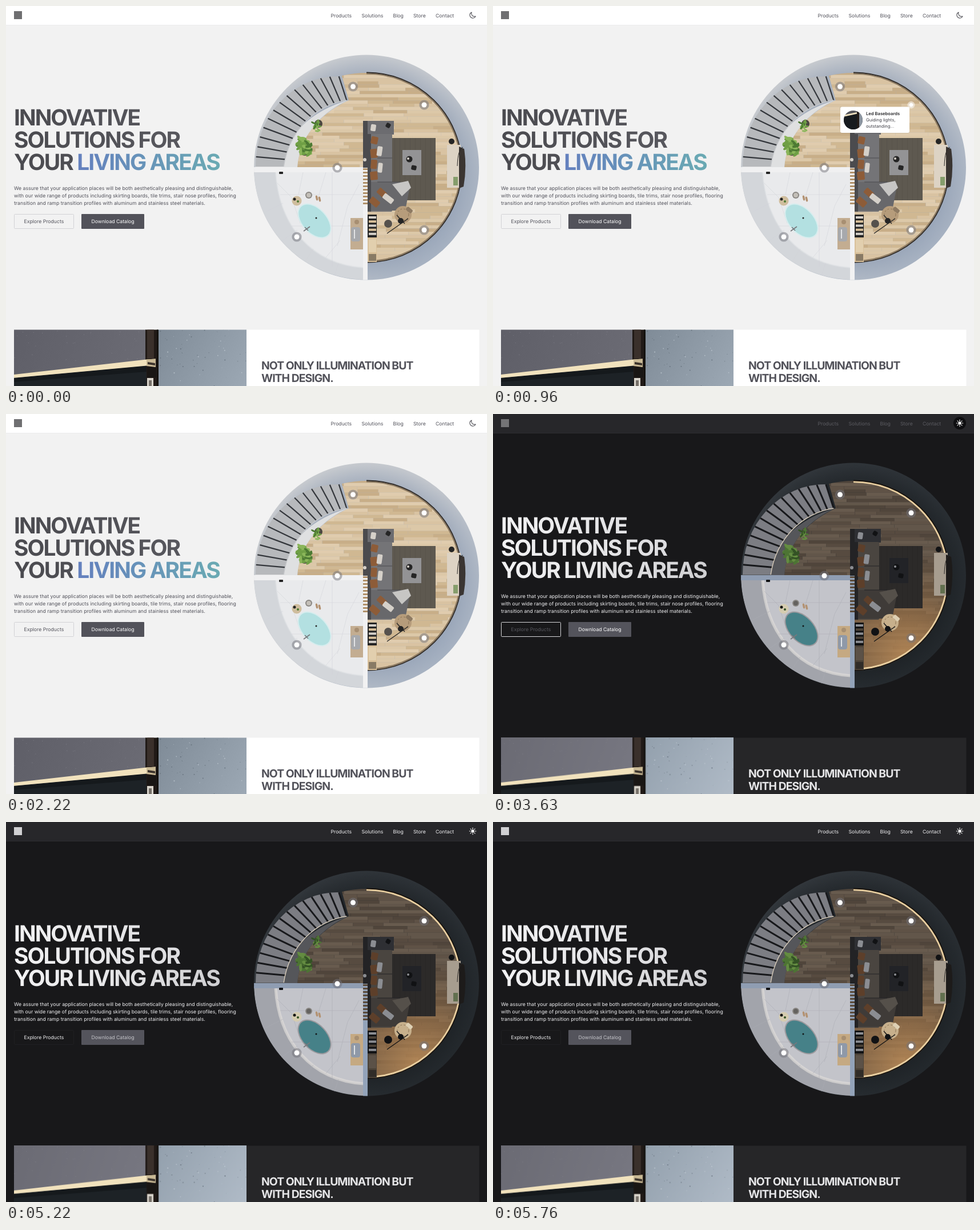
Write an HTML page that moves like this. It is 842 by 665 pixels and loops after 5790 ms.

```html
<!DOCTYPE html>
<html lang="en">
<head>
<meta charset="utf-8">
<title>Living areas</title>
<style>
html, body { margin: 0; width: 100%; height: 100%; overflow: hidden; background: #f2f2f2; }
svg { display: block; width: 842px; height: 665px; }
text { font-family: Inter, "Liberation Sans", sans-serif; font-size: 8.68px; text-rendering: geometricPrecision; white-space: pre; }
.h1, .h2 { font-weight: 700; letter-spacing: -.05em; }
.h1 { font-size: 38.9px; }
.h2 { font-size: 19.4px; }
.tip text { font-size: 7.63px; fill: #3f3f46; }
.tip .name { font-weight: 600; fill: #27272a; }
.tip { opacity: 0; transform-origin: 668px 200px; }
.zoom { transform-origin: 217.5px 700px; }
.night { opacity: 0; }
</style>
</head>
<body>
<svg id="stage" viewBox="0 0 842 665" xmlns="http://www.w3.org/2000/svg"></svg>
<script>
const LOOP = 5790;

const day = {
  id: 'day', bg: '#f2f2f2', bar: '#ffffff', card: '#ffffff', line: '#ebebec',
  head: ['#4a4a4f', '#58585e'], accent: ['#6480be', '#6aaab3'], text: '#52525b', mark: '#6f6f71',
  border: '#d2d2d5', button: '#52525a', buttonText: '#ffffff',
  wall: ['#c9ccd0', '#c3c7cd', '#a3afc0'], edge: '#8292ab',
  wood: ['#d9c3a2', '#d0b892', '#e0ccae', '#c8ae88', '#dcc8a8'],
  step: '#b7b9bc', tread: '#33363b', curb: '#dfe0e1',
  tile: '#e9eaec', tileEdge: '#d3d6da', vein: '#cfd2d6', beam: '#f0f0f1', post: '#f1f1f2',
  rail: '#2f2b28', glow: '#8c7a62',
  desk: '#6c6c70', sofa: '#747477', sofaBack: '#4b4b4e', seat: '#68686b', throwRug: '#c7c6c4',
  pillow: '#8d5c38', pale: '#d5d0c9', rug: '#5e5950', table: '#939395', dark: '#252525',
  media: '#ddd3c4', tv: '#3a3532', pouf: '#b69c7b', shelf: '#d9c09a',
  water: '#b3e0e1', rim: '#d6edee', vanity: '#c3ad91', basin: '#a7a9ad', leaf: ['#6f9f45', '#8bb65a', '#4d7a33'],
  concrete: ['#5f5f68', '#6b6b74'], slab: ['#7f8b97', '#9ca8b4']
};
const night = {
  id: 'night', bg: '#18181a', bar: '#27272a', card: '#262628', line: '#2c2c2f',
  head: ['#f2f2f3', '#dcdcdf'], accent: ['#ececed', '#cfcfd2'], text: '#f1f1f3', mark: '#d0d0d2',
  border: '#1f1f22', button: '#54545c', buttonText: '#c6c6cb',
  wall: ['#33383d', '#2c3136', '#23282c'], edge: '#15191c',
  wood: ['#5f5246', '#574b40', '#685b4e', '#50453b', '#62564a'],
  step: '#7c7d83', tread: '#17181b', curb: '#55565a',
  tile: '#c3c4ca', tileEdge: '#a2a4ab', vein: '#a9abb3', beam: '#8f9db2', post: '#93a3b9',
  rail: '#17120e', glow: '#e9cfa0',
  desk: '#2e2f33', sofa: '#4a4540', sofaBack: '#232325', seat: '#3f3b38', throwRug: '#55504a',
  pillow: '#5d3f2a', pale: '#8b8d92', rug: '#2c2a29', table: '#222327', dark: '#111214',
  media: '#a79d8f', tv: '#1d1b1a', pouf: '#c7b08c', shelf: '#4b4238',
  water: '#468188', rim: '#9c9a9e', vanity: '#c5a982', basin: '#8f99a8', leaf: ['#4d7434', '#648c41', '#345225'],
  concrete: ['#6b6b74', '#777781'], slab: ['#93a0ad', '#b0bbc7']
};

function seeded(s) {
  return () => (s = (s * 16807) % 2147483647) / 2147483647;
}
const rect = (x, y, x2, y2, fill, more = '') =>
  `<rect x="${x}" y="${y}" width="${x2 - x}" height="${y2 - y}" fill="${fill}" ${more}/>`;
const disc = (x, y, r, fill, more = '') => `<circle cx="${x}" cy="${y}" r="${r}" fill="${fill}" ${more}/>`;
const path = (d, fill, more = '') => `<path d="${d}" fill="${fill}" ${more}/>`;
const stroke = (d, color, w, more = '') => path(d, 'none', `stroke="${color}" stroke-width="${w}" ${more}`);
const label = (x, y, s, fill, cls = '') => `<text x="${x}" y="${y}" fill="${fill}" class="${cls}">${s}</text>`;
const stops = list => list.map((c, i) => `<stop offset="${i / (list.length - 1)}" stop-color="${c}"/>`).join('');
const linear = (id, x1, y1, x2, y2, list) =>
  `<linearGradient id="${id}" gradientUnits="userSpaceOnUse" x1="${x1}" y1="${y1}" x2="${x2}" y2="${y2}">${stops(list)}</linearGradient>`;
const times = (n, f) => Array.from({ length: n }, (_, i) => f(i)).join('');

function planks(p) {
  const rnd = seeded(77);
  let out = '';
  for (let y = 115; y < 452; y += 5.6) {
    for (let x = 495 - rnd() * 40; x < 800;) {
      const w = 35 + rnd() * 60;
      out += rect(x.toFixed(1), y.toFixed(1), (x + w).toFixed(1), (y + 5.8).toFixed(1), p.wood[Math.floor(rnd() * 5)]);
      x += w;
    }
  }
  return out;
}

// Spiral stair: u runs from the lowest tread (0) to the top one (1).
function stairs(p) {
  const at = (u, inner) => {
    const a = (5 + 67 * u) * Math.PI / 180;
    const r = inner ? 146 - 24 * u : 197 - 31 * Math.max(0, u) ** 2.2;
    return (634 - r * Math.cos(a)).toFixed(1) + ',' + (281 - r * Math.sin(a)).toFixed(1);
  };
  const us = Array.from({ length: 17 }, (_, i) => -.075 + i * 1.075 / 16);
  const side = inner => us.map(u => at(u, inner));
  return path('M' + [...side(false), ...side(true).reverse()].join('L') + 'Z', p.step) +
    times(14, i => stroke(`M${at(i / 13)}L${at(i / 13, true)}`, p.tread, p.id == 'day' ? 2.2 : 3)) +
    stroke('M' + side(true).join('L'), p.id == 'day' ? '#c6c8cb' : '#d8ccba', 1.4);
}

function plant(x, y, r, n, p, seed) {
  const rnd = seeded(seed);
  return times(n, i => {
    const a = rnd() * 360, d = rnd() * r * .7;
    const px = x + d * Math.cos(a), py = y + d * Math.sin(a) * 1.35;
    return `<ellipse cx="${px.toFixed(1)}" cy="${py.toFixed(1)}" rx="${(r * .38).toFixed(1)}" ry="${(r * .15).toFixed(1)}" fill="${p.leaf[i % 3]}" transform="rotate(${Math.round(a * 57)} ${px.toFixed(1)} ${py.toFixed(1)})"/>`;
  });
}

const cushion = (x, y, w, h, turn, fill) =>
  rect(x - w / 2, y - h / 2, x + w / 2, y + h / 2, fill, `rx="2" transform="rotate(${turn} ${x} ${y})"`);

function bathroom(p) {
  return path('M434 287H626V479A197 197 0 0 1 434 287Z', p.tileEdge) +
    path('M472 291H626V458C535 452 478 385 472 291Z', p.tile) +
    stroke('M472 291C478 385 535 452 626 458', p.id == 'day' ? '#dfe1e4' : '#dedcd9', p.id == 'day' ? 2 : 5, 'opacity=".7"') +
    stroke('M571 291V456M480 330H626M500 385H626M520 291L512 330M545 340L560 291M580 420L598 350L618 312M475 310L500 335L515 380M560 440L585 410M455 360L485 345M480 413L510 392M520 452L538 425M575 472L582 450', p.vein, .7, 'opacity=".75"') +
    rect(434, 282, 626, 291, p.beam) +
    rect(478, 290, 485, 294, p.dark, 'rx="1"') +
    `<g transform="rotate(47 540 376)"><ellipse cx="540" cy="376" rx="36" ry="22.5" fill="${p.rim}"/><ellipse cx="540" cy="376" rx="34" ry="20.5" fill="${p.water}"/></g>` +
    disc(543, 371, 1.5, p.dark) + stroke('M521 394L532 386M523 387L529 393', '#77787c', 1.6) +
    disc(509, 341, 8.5, p.id == 'day' ? '#cfbd9d' : '#d5ccb0') + disc(505, 338, 2.5, p.dark) + disc(511, 342, 2, p.leaf[2]) +
    disc(530, 331, 6, '#8a8783') + disc(530, 331, 4, p.id == 'day' ? '#c3bfb8' : '#64625f') +
    cushion(544, 336, 3.5, 9, -12, '#b39272') + cushion(549, 338, 3.5, 9, -12, '#b39272') +
    rect(603, 371, 625, 426, p.vanity) + rect(604, 387, 620, 412, p.basin, 'rx="4"') + rect(609, 391, 611, 407, '#e2e3e5') +
    disc(614, 378, 4, '#a78f72');
}

function livingRoom(p) {
  return rect(625, 201, 679, 225, p.desk) + rect(625, 201, 633, 283, p.sofaBack) +
    cushion(643, 213, 9, 12, 8, p.pale) + cushion(669, 209, 8, 8, 30, p.dark) + disc(628, 269, 3, p.pale) +
    rect(676, 231, 752, 340, p.rug) +
    times(8, i => rect(680 + i * 9, 231, 681 + i * 9, 340, '#000', 'opacity=".06"')) +
    rect(633, 224, 676, 360, p.sofa, 'rx="2"') + path('M633 308H702Q708 309 707 316L700 352Q698 358 690 358H633Z', p.seat) +
    rect(633, 224, 639, 360, p.sofaBack) + stroke('M650 266H676M650 308H690', p.sofaBack, 1) +
    cushion(645, 235, 12, 13, 12, p.pillow) + cushion(644, 258, 12, 16, -6, p.pillow) +
    cushion(654, 254, 9, 17, 8, p.pale) + cushion(644, 277, 11, 16, 5, p.pillow) +
    cushion(655, 283, 8, 17, 6, p.pale) + cushion(644, 297, 13, 15, -5, p.pillow) +
    path('M676 312L704 306L709 318L693 333Z', p.throwRug) +
    cushion(658, 327, 17, 11, 42, p.pillow) + cushion(669, 337, 20, 10, 38, p.pale) + cushion(645, 343, 18, 12, 40, p.pillow) +
    rect(694, 252, 727, 296, p.table) + disc(706, 268, 5.5, p.dark) + disc(704, 267, 2, p.pale) + cushion(714, 283, 9, 8, 12, p.dark) +
    rect(772, 243, 796, 318, p.media) + path('M793 246L802 250Q807 282 801 316L793 319Z', p.tv) +
    stroke('M790 280Q791 250 800 247', '#2a2826', 1) + disc(780, 237, 5, p.dark) + rect(783, 299, 791, 314, p.leaf[2], 'opacity=".6"') +
    disc(695, 365, 15, p.pouf) + disc(695, 365, 10, 'none', `stroke="#8b7355" stroke-dasharray="3 3"`) +
    cushion(706, 357, 12, 7, 40, p.id == 'day' ? '#8e7a62' : '#ded0b4') +
    disc(669, 381, 7, p.id == 'day' ? '#55514d' : p.dark) +
    stroke('M667 398L704 372M684 366L698 381', p.dark, 1.3) + disc(691, 376, 5, p.dark) +
    rect(633, 365, 649, 405, p.dark) +
    times(5, i => rect(635, 368 + i * 7.2, 648, 372 + i * 7.2, i % 2 ? p.shelf : p.pale)) +
    rect(633, 405, 649, 448, p.shelf) + rect(635, 408, 648, 431, p.id == 'day' ? '#e2cfae' : '#5b5147') + rect(635, 434, 648, 446, p.dark, 'opacity=".45"');
}

const spots = [[607.5, 141], [732, 173], [580, 283], [732, 392], [509, 404]];
const hotspot = ([x, y], i) =>
  `<g class="spot${i}" style="transform-origin:${x}px ${y}px">${disc(x, y, 8.6, '#71717a', 'opacity=".5"')}${disc(x, y, 4.5, '#fff')}</g>`;

function plan(p) {
  const lit = p.id == 'night';
  return `<g clip-path="url(#round)">` +
    rect(434, 85, 829, 480, `url(#wall-${p.id})`) + disc(631, 282, 197, `url(#edge-${p.id})`) +
    path('M434 283L437 281L600 165C545 190 512 235 510 283Z', p.curb) +
    `<g clip-path="url(#floor)">${planks(p)}` +
    (lit ? rect(495, 110, 800, 455, 'url(#lamp)') : '') + '</g>' +
    stroke('M631 118.5A164 164 0 0 1 633 446.500', p.glow, lit ? 3.5 : 2.2) +
    stroke('M631 116.500A166 166 0 0 1 633 448.500', p.rail, 1.8) +
    path('M487 283C488 228 530 185 600 164.500C546 188 512 235 510 283Z', p.curb) + stairs(p) +
    disc(523, 254, 8, '#57514a') + plant(523, 245, 18, 44, p, 11) +
    disc(547, 206, 7, '#4b4640') + plant(543, 210, 10, 22, p, 29) +
    bathroom(p) + livingRoom(p) +
    rect(625, 283, 633, 480, p.post) +
    times(11, i => rect(625, 284 + i * 6, 633, 287 + i * 6, lit ? '#5a4a3a' : '#b0916a')) +
    '</g>' + spots.map(hotspot).join('');
}

function photo(p) {
  const rnd = seeded(5);
  return `<g clip-path="url(#frame)"><g class="zoom">` +
    rect(0, 540, 246, 680, `url(#concrete-${p.id})`) + rect(264, 540, 440, 680, `url(#slab-${p.id})`) +
    times(60, () => disc((270 + rnd() * 150).toFixed(1), (560 + rnd() * 105).toFixed(1), (.3 + rnd() * .8).toFixed(1), rnd() > .6 ? '#cbd4dc' : '#56616c', 'opacity=".6"')) +
    times(30, () => disc((14 + rnd() * 225).toFixed(1), (567 + rnd() * 55).toFixed(1), .6, '#8d8d96', 'opacity=".6"')) +
    rect(244, 540, 266, 680, '#211a17') + rect(247, 540, 259, 617, '#3a302b') + rect(264, 540, 267, 680, '#14120f') +
    path('M0 652L246 629V690H0Z', '#15191c') + path('M0 659L246 640V690H0Z', '#1d2226') +
    path('M0 646.500L246 618.500L262 617.500L262 620L246 629.500L0 652Z', '#f1e2bd') +
    path('M246 618.500L262 617.500V632L246 630Z', '#c9b995') + path('M248 623L261 625V629L248 627Z', '#3b332c') +
    rect(247, 632, 263, 650, '#191614') + rect(247, 651, 258, 670, '#d9d5cc') + rect(250, 655, 255, 670, '#77716a') +
    '</g></g>';
}

const moon = 'M21.75 15A9.7 9.7 0 0 1 18 15.750C12.600 15.750 8.250 11.400 8.250 6C8.250 4.700 8.500 3.400 9 2.250A9.750 9.750 0 0 0 3 11.250C3 16.600 7.400 21 12.750 21A9.750 9.750 0 0 0 21.750 15Z';
const sun = disc(817, 16, 2.7, '#fff') +
  times(8, i => `<path d="M817 11.900V10.300" stroke="#fff" stroke-width="1.1" stroke-linecap="round" transform="rotate(${i * 45} 817 16)"/>`);

const tip = `<g class="tip">` +
  rect(608, 177.5, 729, 223, '#000', 'rx="4" opacity=".08"') + rect(608, 176.5, 729, 222, '#fff', 'rx="3"') +
  `<g clip-path="url(#thumb)">` + rect(613, 182, 648, 217, '#55565c') + path('M613 193L638 188V217H613Z', '#171b1f') +
  path('M613 191L637 186L638 188.500L613 194Z', '#f0e2c0') + rect(637, 182, 641, 217, '#221c19') + rect(641, 182, 648, 217, '#8a949f') + '</g>' +
  label(653, 191, 'Led Baseboards', '', 'name') + label(653, 201.8, 'Guiding lights,', '') + label(653, 212.6, 'outstanding...', '') + '</g>';

function page(p) {
  const lit = p.id == 'night', head = `url(#head-${p.id})`, u = p.id;
  const menu = [[568.5, 'Products'], [622.5, 'Solutions'], [677.5, 'Blog'], [713, 'Store'], [752, 'Contact']];
  return `<defs>` +
    linear('wall-' + u, 470, 110, 815, 400, p.wall) +
    linear('head-' + u, 14, 0, 310, 0, p.head) + linear('accent-' + u, 125, 0, 375, 0, p.accent) +
    linear('concrete-' + u, 14, 567, 240, 640, p.concrete) + linear('slab-' + u, 264, 567, 420, 665, p.slab) +
    `<radialGradient id="edge-${u}"><stop offset=".83" stop-color="${p.edge}" stop-opacity=".45"/><stop offset="1" stop-color="${p.edge}" stop-opacity="0"/></radialGradient></defs>` +
    `<g class="${u}">` + rect(0, 0, 842, 665, p.bg) + rect(0, 0, 842, 33, p.bar) + rect(0, 33, 842, 34, p.line) +
    rect(14, 9, 28, 23, p.mark, 'class="mark"') +
    menu.map(([x, s]) => label(x, 19.7, s, p.text, 'menu')).join('') +
    (lit ? disc(817, 16, 11, '#0e0e10', 'class="halo" opacity="0"') + sun
      : `<path d="${moon}" fill="none" stroke="#3f3f46" stroke-width="1.9" stroke-linejoin="round" transform="translate(810.3 9.800) scale(.54)"/>`) +
    label(14, 209, 'INNOVATIVE', head, 'h1') + label(14, 248, 'SOLUTIONS FOR', head, 'h1') +
    label(14, 287, `YOUR <tspan fill="url(#accent-${u})">LIVING AREAS</tspan>`, head, 'h1') +
    label(14, 321.8, 'We assure that your application places will be both aesthetically pleasing and distinguishable,', p.text) +
    label(14, 334.8, 'with our wide range of products including skirting boards, tile trims, stair nose profiles, flooring', p.text) +
    label(14, 347.8, 'transition and ramp transition profiles with aluminum and stainless steel materials.', p.text) +
    rect(14.5, 364.5, 118.5, 389.5, 'none', `class="outline" rx="1" stroke="${p.border}"`) +
    label(31.5, 380.2, 'Explore Products', p.text, 'explore') +
    rect(132, 364, 242, 390, p.button, 'rx="1"') + label(149.5, 380.2, 'Download Catalog', p.buttonText, 'download') +
    plan(p) + (lit ? '' : tip) +
    rect(421, 566.5, 828.5, 665, p.card) + photo(p) +
    label(447, 636.4, 'NOT ONLY ILLUMINATION BUT', lit ? '#e6e6e8' : '#52525a', 'h2') +
    label(447, 658, 'WITH DESIGN.', lit ? '#e6e6e8' : '#52525a', 'h2') + '</g>';
}

document.getElementById('stage').innerHTML = `<defs>
<clipPath id="round"><circle cx="631" cy="282.500" r="197"/></clipPath>
<clipPath id="floor"><path d="M510 283C512 235 545 190 600 165L588 122Q610 117 631 117A166 166 0 0 1 633 449V283Z"/></clipPath>
<clipPath id="frame"><rect x="14" y="566.500" width="407" height="99"/></clipPath>
<clipPath id="thumb"><circle cx="630.500" cy="199.500" r="16.500"/></clipPath>
<radialGradient id="lamp" gradientUnits="userSpaceOnUse" cx="725" cy="425" r="190"><stop offset="0" stop-color="#c7935a" stop-opacity=".8"/><stop offset=".45" stop-color="#a87a4a" stop-opacity=".55"/><stop offset="1" stop-color="#8a6a48" stop-opacity="0"/></radialGradient>
</defs>` + page(day) + page(night);

const start = document.timeline.currentTime || 0;
// Each step: [time in ms, properties, easing towards the next step]
function run(selector, ...steps) {
  const last = steps[steps.length - 1];
  const frames = [[0, steps[0][1]], ...steps, [LOOP, last[1]]]
    .map(([t, props, easing = 'linear']) => ({ ...props, easing, offset: t / LOOP }));
  for (const el of document.querySelectorAll(selector)) {
    el.animate(frames, { duration: LOOP, iterations: Infinity }).startTime = start;
  }
}
const fade = (selector, from, to) => run(selector, [3630, from, 'ease-in-out'], [3780, to]);
const EASE = 'cubic-bezier(.4,0,.2,1)';

const shut = { opacity: 0, transform: 'scale(.95)' }, open = { opacity: 1, transform: 'scale(1)' };
run('.tip', [735, shut, EASE], [960, open], [2085, open, EASE], [2220, shut]);

const full = { transform: 'scale(1)' }, small = { transform: 'scale(.75)' };
run('.day .spot1', [735, full, EASE], [960, small], [2085, small, EASE], [2220, full]);
const ring = { fill: '#71717a' }, pale = { fill: '#ffffff' };
run('.day .spot1 circle:first-child', [735, ring], [960, pale], [2085, pale], [2220, ring]);

run('.night', [3630, { opacity: 0 }], [3630, { opacity: 1 }]);
fade('.night .menu', { fill: '#5c5c62' }, { fill: night.text });
fade('.night .mark', { fill: '#747476' }, { fill: night.mark });
fade('.night .halo', { opacity: 1 }, { opacity: 0 });
fade('.night .explore', { fill: '#58585f' }, { fill: night.text });
fade('.night .outline', { stroke: '#d6d6d9' }, { stroke: night.border });
fade('.night .download', { fill: '#ffffff' }, { fill: night.buttonText });

const near = { transform: 'scale(1.05)' };
run('.night .zoom', [5205, full, EASE], [5400, near], [5565, near, EASE], [5770, full]);
</script>
</body>
</html>
```
